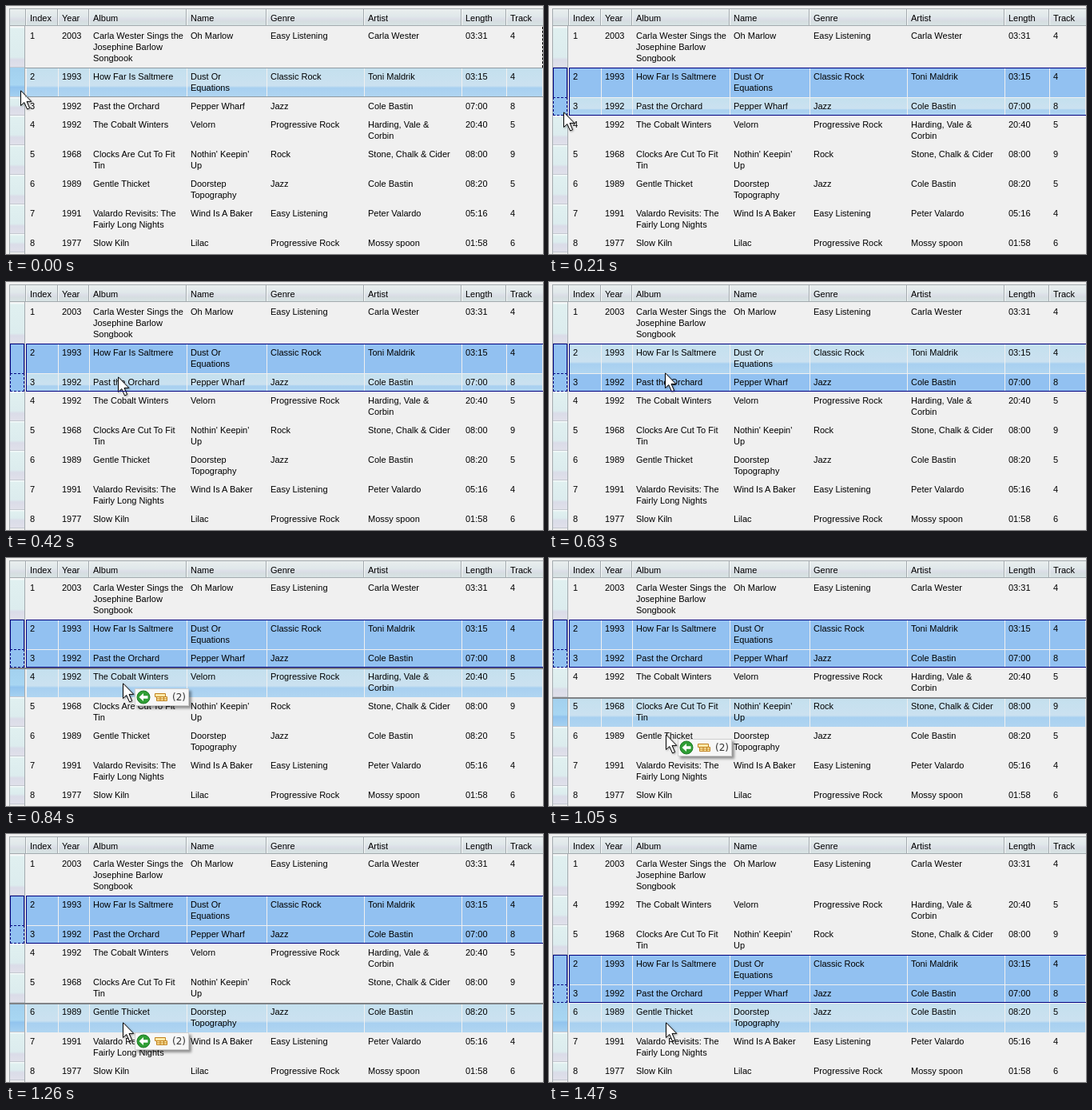
An HTML page that plays this animation: 672 px wide and 310 px high, repeating every 2100 ms.

```html
<!DOCTYPE html>
<html lang="en">
<head>
<meta charset="utf-8">
<title>Dragging rows in a music grid</title>
<style>
  html, body { margin: 0; width: 100%; height: 100%; overflow: hidden; background: #f0f0f0; }
  body { position: relative; font: 11px/14px "Liberation Sans", Arial, sans-serif; color: #000; cursor: default; }
  div, svg { position: absolute; white-space: pre; box-sizing: border-box; }
  #grid { left: 0; top: 0; width: 672px; height: 310px; overflow: hidden; }
  #bar { left: 4px; top: 3px; width: 668px; height: 22px; border: solid #a3aaae; border-width: 1px 0 1px 1px;
    background: linear-gradient(#e9eeee, #e0e8ea 45%, #dcdfe8 60%, #d6dde1 75%, #d8e4e4); }
  #edge { left: 4px; top: 25px; width: 20px; height: 285px; border: solid #a3aaae; border-width: 0 1px; }
  .title { top: 4px; height: 20px; padding: 4px 0 0 5px; border-left: 1px solid #a3aaae; box-shadow: inset 1px 0 #f8fafa; }
  .row { left: 0; width: 672px; }
  .head { left: 5px; top: 0; width: 18px; height: 100%; border-bottom: 1px solid #c4c8d0;
    background: linear-gradient(#f4fafa 1px, #e0f0f0 2px, #dcecee calc(100% - 12px), #dadce8 calc(100% - 9px), #e0e0ea); }
  .cell { top: 1px; bottom: 0; padding: 3px 0 0 4px; }
  .sel .cell, .row.sel .head { background: #92c1f1; }
  .hover .cell { background: linear-gradient(#c4e0ee, #cbe1f0 60%, #a8d0f0 68%, #b0d5f1); }
  .hover .head { background: linear-gradient(#a2d0ee, #a8d6f2 60%, #92c4ee 68%, #a4d0f0); }
  .sel::before { content: ""; position: absolute; left: 25px; right: 0; top: 0; bottom: 0; z-index: 1;
    border: 0 solid #000080; border-left-width: 1px; }
  .first::before { border-top-width: 1px; }
  .last::before { border-bottom-width: 1px; }
  .sel .head { border: 1px solid #000080; border-bottom: 0; }
  .last .head { border: 1px dashed #000080; }
  .lined::before { content: ""; position: absolute; left: 24px; right: 0; top: 0; bottom: 0; z-index: 1;
    border: solid #919ba2; border-width: 1px 0; }
  #focus { left: 671px; top: 26px; height: 51px; border-left: 1px dashed #000; }
  #drop { left: 4px; width: 668px; height: 2px; background: #808386; }
  #hint { left: 161px; width: 68px; height: 22px; background: #f7f7f7; border: 1px solid #d0d0d0;
    box-shadow: 3px 3px 3px #0006; }
  #hint svg { left: 0; top: 0; }
  #hint div { left: 46px; top: 3px; font: 12px/14px "DejaVu Sans", sans-serif; color: #333; }
  #arrow { filter: drop-shadow(1px 1px 1px #0005); }
</style>
</head>
<body>
<div id="grid">
  <div id="bar"></div>
  <div id="edge"></div>
</div>
<div id="focus"></div>
<div id="drop"></div>
<div id="hint">
  <svg width="44" height="20">
    <circle cx="10" cy="10" r="8" fill="#2f9e35" stroke="#1d7a25"/>
    <path d="M4.5 10 L10 5 V8.3 H15.5 V11.7 H10 V15 Z" fill="#fff"/>
    <g fill="#ffe9a8" stroke="#c0801c">
      <path d="M24.5 5.5 h13 v4 h-13 z"/>
      <path d="M26.5 9.5 h13 v5 h-13 z M26.5 12 h13 M31 9.5 v5 M35.5 9.5 v5"/>
    </g>
  </svg>
  <div>(2)</div>
</div>
<svg id="arrow" width="18" height="27">
  <path d="M.5 .8 V19.5 L4.8 15.5 L8.6 24 L11.6 22.6 L8 14.4 H13.8 Z" fill="#fff" stroke="#000"/>
</svg>
<script>
const lefts = [25, 65, 104, 226, 326, 448, 570, 626, 671];
const titles = ["Index", "Year", "Album", "Name", "Genre", "Artist", "Length", "Track"];
// "/" marks a line break
const songs = [
  "2003;Carla Wester Sings the/Josephine Barlow/Songbook;Oh Marlow;Easy Listening;Carla Wester;03:31;4",
  "1993;How Far Is Saltmere;Dust Or/Equations;Classic Rock;Toni Maldrik;03:15;4",
  "1992;Past the Orchard;Pepper Wharf;Jazz;Cole Bastin;07:00;8",
  "1992;The Cobalt Winters;Velorn;Progressive Rock;Harding, Vale &/Corbin;20:40;5",
  "1968;Clocks Are Cut To Fit/Tin;Nothin' Keepin'/Up;Rock;Stone, Chalk & Cider;08:00;9",
  "1989;Gentle Thicket;Doorstep/Topography;Jazz;Cole Bastin;08:20;5",
  "1991;Valardo Revisits: The/Fairly Long Nights;Wind Is A Baker;Easy Listening;Peter Valardo;05:16;4",
  "1977;Slow Kiln;Lilac;Progressive Rock;Mossy spoon;01:58;6"
];
const STEP = 210, LOOP = 2100;
const steps = [
  { hover: 2, arrow: [18, 105] },
  { hover: 3, arrow: [18, 132], sel: true },
  { hover: 3, arrow: [140, 118], sel: true },
  { hover: 2, arrow: [145, 113], sel: true },
  { hover: 4, arrow: [146, 156], sel: true, hint: 163 },
  { hover: 5, arrow: [146, 220], sel: true, hint: 226 },
  { hover: 6, arrow: [146, 235], sel: true, hint: 248 },
  { hover: 6, arrow: [146, 235], sel: true, moved: true }
];

const $ = id => document.getElementById(id);
function add(parent, cls, text = "") {
  const el = document.createElement("div");
  el.className = cls;
  el.textContent = text;
  return parent.appendChild(el);
}
function place(el, left, width) {
  el.style.left = left + "px";
  el.style.width = width + "px";
}

titles.forEach((t, i) => place(add($("grid"), "title", t), lefts[i] - 1, lefts[i + 1] - lefts[i]));

const rows = songs.map((song, i) => {
  const el = add($("grid"), "row");
  add(el, "head");
  const cells = [String(i + 1), ...song.split(";")].map(s => s.split("/"));
  cells.forEach((lines, c) =>
    place(add(el, "cell", lines.join("\n")), lefts[c] + 1, lefts[c + 1] - lefts[c] - 1));
  const height = 9 + 14 * Math.max(...cells.map(lines => lines.length));
  el.style.height = height + "px";
  return { el, height };
});

function show(s) {
  const order = s.moved ? [1, 4, 5, 2, 3, 6, 7, 8] : [1, 2, 3, 4, 5, 6, 7, 8];
  let y = 26;
  for (const id of order) {
    const { el, height } = rows[id - 1];
    const hover = id === s.hover, sel = s.sel && (id === 2 || id === 3);
    el.style.top = y + "px";
    el.className = "row" + (hover ? " hover" : "") + (sel ? " sel " + (id === 2 ? "first" : "last") : "")
      + (hover && !s.sel ? " lined" : "");
    if (hover) $("drop").style.top = y + "px";
    y += height;
  }
  $("focus").hidden = !!s.sel;
  $("drop").hidden = $("hint").hidden = !s.hint;
  $("hint").style.top = s.hint + "px";
  $("arrow").style.left = s.arrow[0] + "px";
  $("arrow").style.top = s.arrow[1] + "px";
}

let current;
function tick() {
  const i = Math.min(steps.length - 1, Math.floor(performance.now() % LOOP / STEP));
  if (i !== current) show(steps[current = i]);
  requestAnimationFrame(tick);
}
tick();
</script>
</body>
</html>
```
